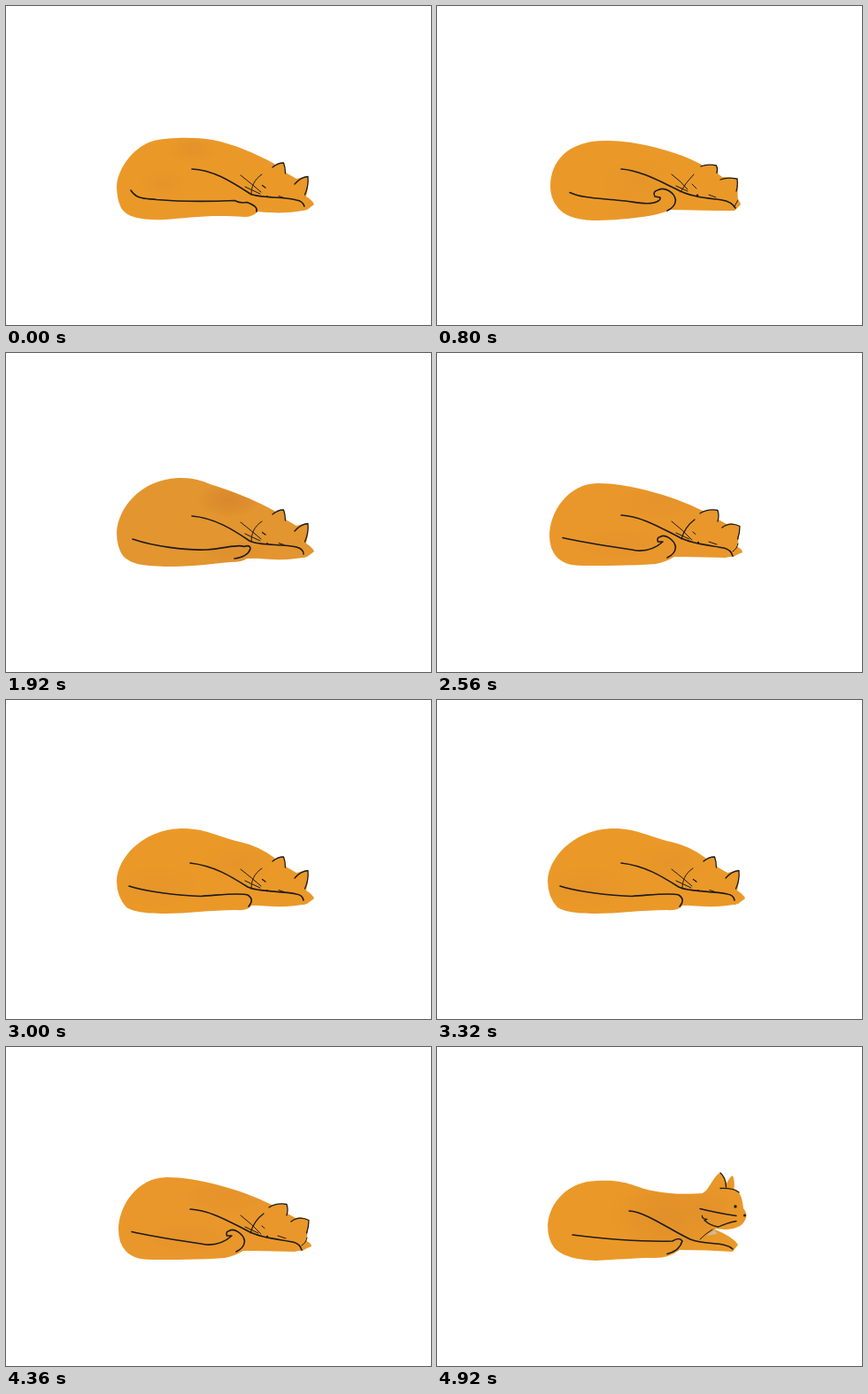
Write an HTML page that moves like this. It is 480 px wide and 360 px high and loops after 5 s.

```html
<!DOCTYPE html>
<html lang="en">
<head>
<meta charset="utf-8">
<title>Sleeping cat</title>
<style>
  html, body { margin: 0; width: 100%; height: 100%; overflow: hidden; background: #fff; }
  svg { display: block; width: 100%; height: 100%; }
  .ink { fill: none; stroke: #1d1a1a; stroke-linecap: round; stroke-linejoin: round; }
</style>
</head>
<body>
<svg id="stage" viewBox="0 0 480 360" xmlns="http://www.w3.org/2000/svg">
  <defs>
    <radialGradient id="shade">
      <stop offset="0" stop-color="#d4822c"/>
      <stop offset=".55" stop-color="#d4822c" stop-opacity=".6"/>
      <stop offset="1" stop-color="#d4822c" stop-opacity="0"/>
    </radialGradient>
  </defs>
</svg>
<script>
const LOOP = 5000;
const stage = document.getElementById('stage');

function add(parent, tag, attrs) {
  const el = document.createElementNS('http://www.w3.org/2000/svg', tag);
  for (const k in attrs) el.setAttribute(k, attrs[k]);
  parent.appendChild(el);
  return el;
}
const ink = (g, d, w) => add(g, 'path', { d, class: 'ink', 'stroke-width': w });

// Head shapes: fill, bold lines, thin lines, dots [x, y, r]
const heads = {
  rest: {
    fill: 'M285 178L300 182Q307 178 314 177L316 188 328 195Q335 193 341 192L341 205 339 215Q346 219 348 224L340 230Q318 235 285 232Z',
    bold: 'M301 182Q307 177 313.500 177Q315.500 182 315.500 189M326 201Q333 193 341 192.500Q342 203 337.500 213M289.500 202.500L293 205',
    thin: 'M289 190C280 196 277 204 277 213M265 191Q279 202 288 210M270 204L287 212M308 214.500L314 216.500',
    dots: [[295, 215, 1.1]]
  },
  curl: {
    fill: 'M280 178L297 181Q306 176 317 177L318 188 327 193Q335 191 342 195L341 208 339 219Q345 221 345 225L338 228 326 231 280 230Z',
    bold: 'M297 181Q306 175.500 317 177.500Q319 184 317 190M322 197Q331 190 342 195.500Q342 203 339.500 210M291 188Q280 196 276 210',
    thin: 'M265 190Q278 200 288 211M270 203L285 210M289 202L292 204.500M307 213L316 216M334 224Q339 221 340 215',
    dots: [[295, 214, 1.2]]
  },
  low: {
    fill: 'M280 180L298 181Q305 178 315.500 180L317 189 322 193Q331 193 339.500 195L339.500 212 340 219Q343 221 343 224L336 231 280 230Z',
    bold: 'M298 181Q306 178 315.500 180Q317.500 184 316 188.500M320 196Q328 193 339 195Q340 203 338 209',
    thin: 'M265 190Q276 198 283 207M290 190Q281 199 275 210M270 203L283 209M288 201L293 206M307 213L315 216M336 226L340 219',
    dots: [[294, 214, 1.4]]
  },
  up: {
    fill: 'M288 169Q297 168 304 162C310 154 315 143 320 142Q325 145 327 154Q331 146 334 145Q336.500 151 335.500 160C343 163 345 172 346 182Q350 187 349.500 191C347 201 340 205 326 206L315 205 303 214 285 213Z',
    bold: 'M297 182.500Q315 187 338 190.500M299.500 190.500Q299 194 305 194.500L302 195.500Q309 202 318 203Q326 199 338 196.500M320 142Q326 147 326.500 158M320 159.500Q335 159 341 164',
    thin: 'M297 217Q304 210 311 206',
    dots: [[337, 180, 1.7], [347.500, 190, 1.5]]
  }
};

// Poses: body fill, back line, belly-and-tail line, head, shades [x, y, rx, ry, opacity]
const TAIL = 'C257 204 268 210 269.500 219Q269 227 260 231';
const poses = {
  long: {
    body: 'M125 204C126 181 147 157 167 152C186 148 214 148 233 151C258 156 281 166 303 178L325 200 345 224 339 230Q315 235 284 232Q279 238 269 238C232 235 205 239 180 241C154 242 137 239 130 228Q125 217 125 204Z',
    back: 'M210 184C234 185 254 198 276 212C286 217 313 215 328 219Q335 220 337 226',
    belly: 'M141 208C148 219 159 217 170 218.500C199 221 222 221 258 219.500Q265 223 272 221.500Q285 226 283 232',
    head: 'rest', shades: [[210, 162, 28, 16, .3], [178, 200, 28, 17, .22]]
  },
  mid: {
    body: 'M125 204C126 178 154 147 196 145C224 144 238 154 264 160Q286 165 303 178L325 200 345 224 337 231 277 232Q274 238 260 237C230 237 205 241 180 241C153 241 143 238 136 234Q125 222 125 204Z',
    back: 'M208 184C235 187 254 199 273 211C285 217 310 215 328 219Q335 220 336 226',
    belly: 'M139 210C157 216 195 221 220 221.500C243 220 262 217 273 220Q281 225 274 233',
    head: 'rest', shades: [[262, 184, 40, 24, .2], [170, 211, 48, 24, .18]]
  },
  full: {
    body: 'M125 203C126 176 151 143 194 141C216 140 224 146 237 150Q276 163 303 178L325 200 345 224 337 231 272 232Q267 236 253 236C225 239 205 241 180 241C151 240 143 238 133 230Q125 220 125 203Z',
    back: 'M210 184C235 186 256 199 275 212C286 218 313 215 328 219Q336 221 336 227',
    belly: 'M143 210C166 218 204 223 226 222C247 221 262 215 269 218.500Q276 216 276 221Q273 230 258 232',
    head: 'rest', tone: '#e3952f', shades: [[252, 166, 36, 20, .65], [258, 225, 42, 13, .25]]
  },
  fall: {
    body: 'M126 204C127 177 148 145 190 144C218 143 259 159 301 178L325 200 344 224 335 230 270 231Q260 238 245 239C215 240 190 242 170 241C148 241 139 237 132 230Q126 218 126 204Z',
    back: 'M209 184C232 186 253 198 272 209C287 217 313 216 325 220Q333 222 334 228',
    belly: 'M143 210C167 214 205 221 228 222C245 223 253 215 263 214Q271 215 273 222Q270 230 259 232',
    head: 'curl', shades: [[226, 178, 52, 26, .2]]
  },
  curl: {
    body: 'M127 206C127 181 147 147 182 147C214 147 264 160 300 178L324 200 344 224 335 230 268 230Q258 236 247 238C220 240 190 240 165 240C148 240 141 236 135 230Q127 221 127 206Z',
    back: 'M208 183C230 184 252 197 270 206C287 216 310 217 324 220Q332 222 334 229',
    belly: 'M142 208.500C165 214 200 219 226 223Q243 224 255 213L249.500 213Q248 208 252 207.500' + TAIL,
    head: 'curl', tone: '#e9972b', shades: [[250, 168, 50, 20, .2], [205, 216, 46, 18, .2]]
  },
  flat: {
    body: 'M128 204C128 176 147 152 190 152C220 151 270 163 299 179L324 200 341 222 334 231 264 230Q249 236 232 238C209 241 192 242 176 242C155 241 143 236 136 227Q128 217 128 204Z',
    back: 'M208 184C228 185 252 198 269 206C286 216 308 217 322 219Q333 221 337 228',
    belly: 'M150 210.500C164 217 184 217 207 219.500C224 221 240 225 248 221Q253 219 252 216L246 215Q243 209 250 207.500' + TAIL,
    head: 'low', shades: [[225, 200, 40, 30, .18], [225, 232, 36, 14, .2]]
  },
  rise: {
    body: 'M126 205C126 178 150 146 183 146C214 147 264 160 300 178L324 200 344 224 335 230 268 230Q258 236 247 238C220 241 190 243 167 242C146 241 139 236 133 229Q126 219 126 205Z',
    back: 'M208 183C230 184 252 197 270 206C287 216 310 217 324 220Q332 222 334 229',
    belly: 'M144 209C167 215 202 219 228 223Q244 224 254 214L248.500 214Q247 208 252 207.500' + TAIL,
    head: 'curl', shades: [[220, 180, 62, 26, .2]]
  },
  alert: {
    body: 'M125 201C127 175 148 152 180 151C214 149 223 158 242 162C265 167 286 166 303 165L314 206Q334 214 340 223L334 231Q304 229 274 229Q262 238 247 238C220 238 205 240 180 241C154 240 140 235 132 226Q125 217 125 201Z',
    back: 'M217 185C236 186 264 207 286 217C304 224 324 219 334 228',
    belly: 'M153 212C186 216 235 220 266 219Q274 214 277 219Q274 230 260 233.500',
    head: 'up', chest: 'M303 213L314 206 316 211Z',
    shades: [[262, 190, 68, 48, .4], [318, 180, 36, 34, .2]]
  }
};
poses.lift = { ...poses.alert, turn: 'rotate(22 292 196)' };
poses.lean = { ...poses.alert, turn: 'translate(2 0)' };

function build(name) {
  const p = poses[name], h = heads[p.head], tone = p.tone || '#ea9928';
  const g = add(stage, 'g', { visibility: 'hidden' });
  const clip = add(g, 'clipPath', { id: 'clip-' + name });
  add(clip, 'path', { d: p.body });
  add(clip, 'path', { d: h.fill, transform: p.turn || '' });
  add(g, 'path', { d: p.body, fill: tone });
  if (p.chest) add(g, 'path', { d: p.chest, fill: '#c9c3ad' });
  add(g, 'path', { d: h.fill, fill: tone, transform: p.turn || '' });
  const wash = add(g, 'g', { 'clip-path': `url(#clip-${name})` });
  for (const [cx, cy, rx, ry, opacity] of p.shades)
    add(wash, 'ellipse', { cx, cy, rx, ry, opacity, fill: 'url(#shade)' });
  ink(g, p.back, 1.6);
  ink(g, p.belly, 1.6);
  const face = add(g, 'g', { transform: p.turn || '' });
  ink(face, h.bold, 1.3);
  ink(face, h.thin, 1);
  for (const [cx, cy, r] of h.dots) add(face, 'circle', { cx, cy, r, fill: '#1d1a1a' });
  return g;
}

const drawn = {};
for (const name in poses) drawn[name] = build(name);

const specks = add(stage, 'g', { visibility: 'hidden' });
ink(specks, 'M408 184.500H413M414 201.500H417M418 199.500H421M422 197.500L424 196.500', 1.1);

const steps = [
  [0, 'long'], [160, 'mid'], [320, 'full'], [480, 'fall'], [640, 'curl'], [800, 'flat'],
  [960, 'rise'], [1120, 'fall'], [1200, 'full'], [1280, 'mid'], [1440, 'long'], [1520, 'mid'],
  [1600, 'full'], [1760, 'mid'], [1840, 'long'], [1920, 'full'], [2080, 'fall'], [2160, 'curl'],
  [2240, 'flat'], [2400, 'rise'], [2480, 'flat'], [2560, 'curl'], [2680, 'rise'], [2760, 'fall'],
  [2840, 'full'], [3000, 'mid'], [3080, 'long'], [3160, 'full'], [3320, 'mid'], [3400, 'long'],
  [3480, 'full'], [3640, 'mid'], [3720, 'full'], [3800, 'fall'], [3880, 'curl'], [4040, 'flat'],
  [4200, 'rise'], [4360, 'curl'], [4520, 'lift'], [4680, 'alert'], [4840, 'lean'], [4920, 'alert']
];

let shown;
function draw(t) {
  let name;
  for (const [at, pose] of steps) if (t >= at) name = pose;
  if (name !== shown) {
    if (shown) drawn[shown].setAttribute('visibility', 'hidden');
    drawn[name].setAttribute('visibility', 'visible');
    shown = name;
  }
  const tick = Math.floor((t - 3920) / 40);
  specks.setAttribute('visibility', t >= 3880 && t < 4320 ? 'visible' : 'hidden');
  specks.setAttribute('transform', `translate(${-2 * tick} ${2 * Math.sin(tick * .9)})`);
}

const start = performance.now();
function frame() {
  draw((performance.now() - start) % LOOP);
  requestAnimationFrame(frame);
}
frame();
</script>
</body>
</html>
```
